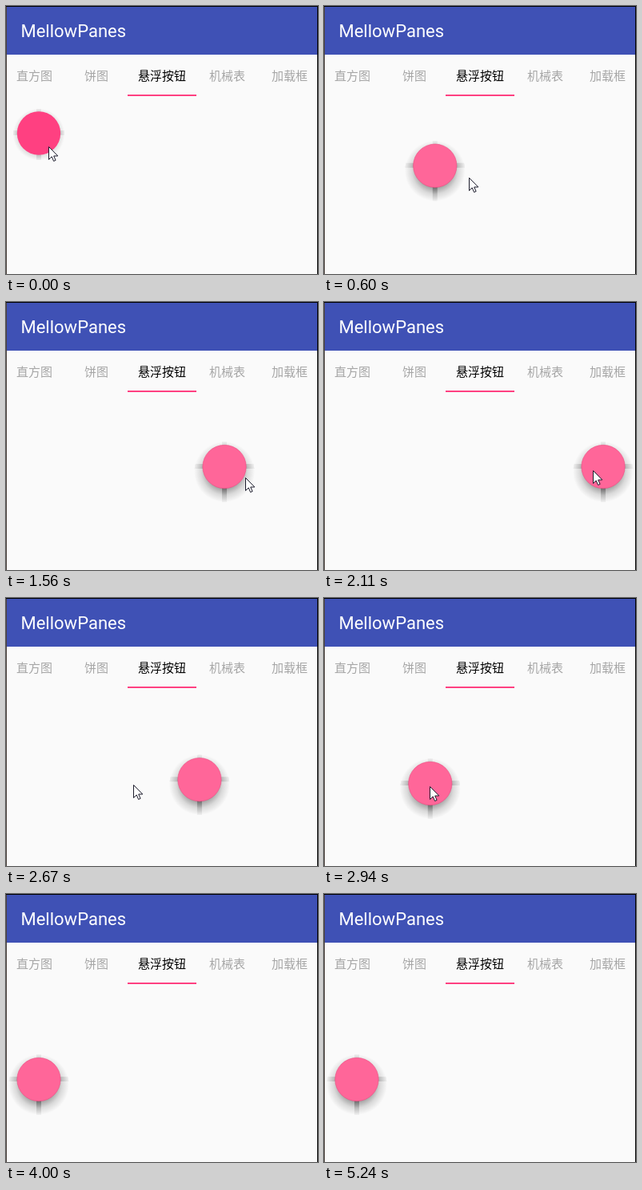
Write an HTML page that moves like this. It is 390x336 px and loops after 5.34 s.

```html
<!DOCTYPE html>
<html lang="zh-CN">
<head>
<meta charset="utf-8">
<title>Floating button</title>
<style>
  html, body { margin: 0; width: 100%; height: 100%; overflow: hidden; background: #fafafa; }
  svg { display: block; width: 390px; height: 336px; }
  .title { font: 22px Roboto, sans-serif; fill: #fff; }
  .tabs { font: 15px "Noto Sans CJK SC", "Noto Sans CJK", sans-serif; fill: #a6a6a6; }
  .tabs .active { fill: #000; }
</style>
</head>
<body>
<svg viewBox="0 0 390 336">
  <defs>
    <radialGradient id="halo" class="shade" gradientUnits="userSpaceOnUse" cx="0" cy="0" r="38">
      <stop offset=".54" stop-opacity=".36"/>
      <stop offset=".76" stop-opacity=".13"/>
      <stop offset="1" stop-opacity="0"/>
    </radialGradient>
    <radialGradient id="seam" class="shade" gradientUnits="userSpaceOnUse" cx="0" cy="0" r="38">
      <stop offset=".54" stop-opacity=".32"/>
      <stop offset=".78" stop-opacity=".14"/>
      <stop offset=".99" stop-opacity=".04"/>
      <stop offset="1" stop-opacity="0"/>
    </radialGradient>
  </defs>

  <rect width="390" height="336" fill="#fafafa"/>
  <rect width="390" height="61" fill="#3f51b5"/>
  <text class="title" x="18.5" y="39">MellowPanes</text>
  <g class="tabs">
    <text x="13" y="92.5">直方图</text>
    <text x="98" y="92.5">饼图</text>
    <text x="165" y="92.5" class="active">悬浮按钮</text>
    <text x="254" y="92.5">机械表</text>
    <text x="332" y="92.5">加载框</text>
  </g>
  <rect x="152" y="111" width="86" height="2" fill="#ff4081"/>

  <g id="button">
    <g id="shadow">
      <circle id="disc" r="38" fill="url(#halo)"/>
      <rect id="crossbar" x="-40" y="-3" width="80" height="6" fill="url(#seam)"/>
      <rect x="-3" y="-46" width="6" height="92" fill="url(#seam)"/>
    </g>
    <circle id="face" r="27.2"/>
  </g>

  <path id="pointer" d="M.5.5V16.5L4.2 12.9 6.6 18.5 9.1 17.4 6.7 12H11.8Z"
        fill="#fff" stroke="#1b1b2b" stroke-linejoin="round"/>

  <path d="M.5 0V336" stroke="#4a403c"/>
  <path d="M0 .5H390M389.5 0V336" stroke="#000"/>
</svg>

<script>
const LOOP = 5340;

// Each burst shows three slow steps, then two quick ones, then holds.
const bursts = [0, 450, 1260, 1950, 2370, 3310];
const SLOW = 150, QUICK = 120;

// A track is its first value, then glides of [start time, end time, new value].
const tracks = {
  buttonX: [41, [60, 1140, 236.5], [1320, 1950, 349], [2385, 2960, 132], [3460, 3890, 41]],
  buttonY: [159.5, [60, 760, 206.5], [2300, 2810, 232.5]],
  pointerX: [53, [20, 925, 235], [1290, 1760, 340], [1760, 1950, 321], [1950, 2110, 336],
             [2125, 2830, 132], [3460, 3650, 40], [3760, 3880, 289]],
  pointerY: [176, [20, 600, 215], [1400, 1830, 231], [1830, 2110, 211],
             [2110, 2800, 236], [3760, 3880, 320], [3880, 4000, 340]],
  lift: [0, [100, 300, 1]]
};

const [button, shadow, disc, crossbar, face, pointer] =
  ["button", "shadow", "disc", "crossbar", "face", "pointer"].map(id => document.getElementById(id));
const shades = document.querySelectorAll(".shade");
const mix = (a, b, k) => a + (b - a) * k;
const move = (node, x, y) => node.setAttribute("transform", `translate(${x} ${y})`);

function ease(time, start, end) {
  const k = Math.min(1, Math.max(0, (time - start) / (end - start)));
  return k * k * (3 - 2 * k);
}

const valueAt = ([first, ...glides], time) =>
  glides.reduce((value, [start, end, goal]) => mix(value, goal, ease(time, start, end)), first);

function snap(time) {
  const start = bursts.findLast(burst => burst <= time);
  const slow = Math.min(3, Math.floor((time - start) / SLOW));
  const rest = time - start - slow * SLOW;
  const quick = slow < 3 ? 0 : Math.min(2, Math.floor(rest / QUICK));
  return start + slow * SLOW + quick * QUICK;
}

// lift: 0 at rest, 1 fully raised by the press
function setLift(lift) {
  const drop = mix(1.5, 6.5, lift);
  const radius = mix(32.5, 38, lift);
  move(shadow, 0, drop);
  crossbar.setAttribute("y", -3.5 - drop);
  for (const node of [disc, ...shades]) node.setAttribute("r", radius);
  face.setAttribute("fill", `rgb(255 ${mix(64, 102, lift)} ${mix(129, 153, lift)})`);
  face.setAttribute("stroke", `rgb(235 70 125 / ${lift * 0.5})`);
}

function draw(time) {
  const shown = snap(time);
  const at = name => valueAt(tracks[name], shown);
  move(button, at("buttonX"), at("buttonY"));
  move(pointer, Math.round(at("pointerX")), Math.round(at("pointerY")));
  setLift(at("lift"));
}

const origin = performance.now();
function tick() {
  draw((performance.now() - origin) % LOOP);
  requestAnimationFrame(tick);
}
tick();
</script>
</body>
</html>
```
